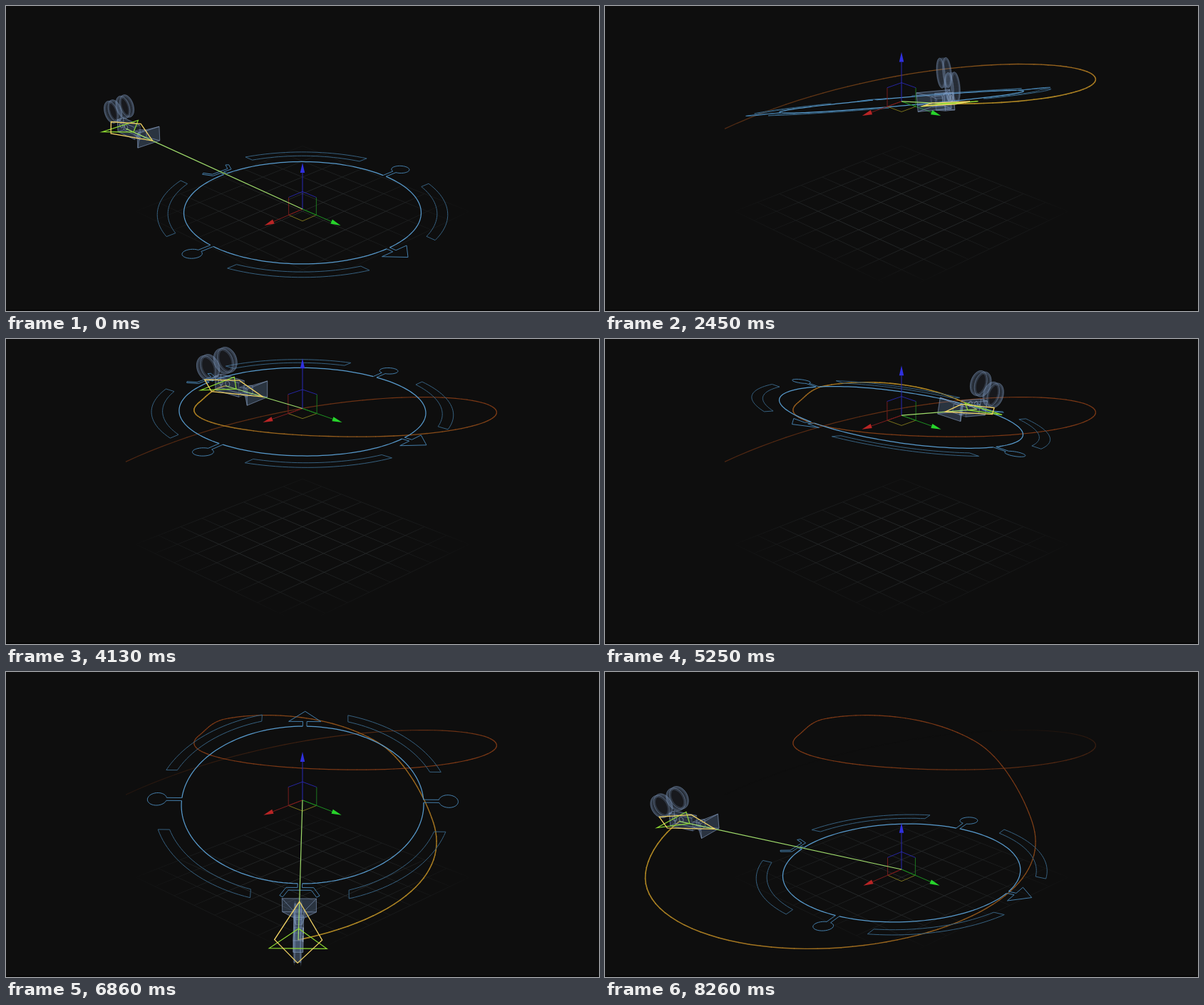
An HTML page with a canvas for the animation above (8.33 s loop, 832 by 428 pixels).

```html
<!DOCTYPE html>
<html>
<head>
<meta charset="utf-8">
<title>Orbiting camera</title>
<style>
html, body { margin: 0; width: 100%; height: 100%; overflow: hidden; background: #0e0e0e; }
canvas { display: block; }
</style>
</head>
<body>
<canvas id="stage" width="832" height="428"></canvas>
<script>
const ctx = document.getElementById('stage').getContext('2d');
const LOOP = 8330, STEP = 70, DIST = 2100, RING = 168.5, GROUND = -82;
const PITCH = 23.5 * Math.PI / 180, SIN = Math.sin(PITCH), COS = Math.cos(PITCH);

// seconds, orbit radius, height above the pivot, height of the pivot
const KEYS = [
  [0, 414, 0, -78.6], [1.4, 278, 84, 17.3], [2.45, 220, 80, 86],
  [3.68, 141, 15, 118], [4.13, 140, 2, 124], [5.25, 157, -33, 114],
  [5.85, 183, -78, 87], [6.86, 258, -83, 37], [7.9, 365, -44, -42],
  [8.26, 399, -13, -69.6]
];

// smooth curve through the keys
function track(t, c) {
  const last = KEYS.length - 1;
  let i = 0;
  while (i < last - 1 && t > KEYS[i + 1][0]) i++;
  const slope = j => {
    const a = KEYS[Math.max(j - 1, 0)], b = KEYS[Math.min(j + 1, last)];
    return (b[c] - a[c]) / (b[0] - a[0]);
  };
  const [a, b] = [KEYS[i], KEYS[i + 1]];
  const d = b[0] - a[0], s = (t - a[0]) / d, q = s * s, k = q * s;
  return (2 * k - 3 * q + 1) * a[c] + (k - 2 * q + s) * d * slope(i)
    + (3 * q - 2 * k) * b[c] + (k - q) * d * slope(i + 1);
}

function pose(t) {
  const az = (223.3 - 85.2 * t) * Math.PI / 180;
  const r = track(t, 1), h = track(t, 2), z = track(t, 3);
  const sx = Math.sin(az), cy = Math.cos(az), len = Math.hypot(r, h), sa = h / len, ca = r / len;
  return {
    pivot: [0, 0, z],
    eye: [r * sx, r * cy, z + h],
    out: [ca * sx, ca * cy, sa],
    side: [cy, -sx, 0],
    up: [-sa * sx, -sa * cy, ca]
  };
}

// x right, y towards the viewer, z up
function project([x, y, z]) {
  const s = DIST / (DIST - y * COS - z * SIN);
  return [416 + x * s, 214 + (y * SIN - z * COS) * s];
}

const offset = (o, a, u, b = 0, v = u, c = 0, w = u) =>
  o.map((n, i) => n + a * u[i] + b * v[i] + c * w[i]);

function draw(points, { stroke, fill, width = 1, close = false }) {
  ctx.beginPath();
  points.forEach(p => ctx.lineTo(...project(p)));
  if (close) ctx.closePath();
  if (fill) { ctx.fillStyle = fill; ctx.fill(); }
  if (stroke) { ctx.strokeStyle = stroke; ctx.lineWidth = width; ctx.stroke(); }
}

const arc = (r, from, to, n = 40, x = 0, y = 0) => Array.from({ length: n + 1 }, (_, i) => {
  const a = from + (to - from) * i / n;
  return [x + r * Math.cos(a), y + r * Math.sin(a)];
});

function drawGrid() {
  const half = 168, k = Math.SQRT1_2;
  const at = (a, b) => [(a - b) * k, (a + b) * k, GROUND];
  // lines fade out towards the rim of the floor
  const [cx, cy] = project([0, 0, GROUND]);
  const g = ctx.createRadialGradient(0, 0, 0, 0, 0, 238);
  g.addColorStop(0, '#303435');
  g.addColorStop(0.5, '#232627');
  g.addColorStop(1, '#0e0e0e');
  ctx.save();
  ctx.beginPath();
  for (let c = -half; c <= half; c += 42) {
    for (const [a, b] of [[at(c, -half), at(c, half)], [at(-half, c), at(half, c)]]) {
      ctx.moveTo(...project(a));
      ctx.lineTo(...project(b));
    }
  }
  ctx.translate(cx, cy);
  ctx.scale(1, 0.43);
  ctx.strokeStyle = g;
  ctx.lineWidth = 1.2;
  ctx.stroke();
  ctx.restore();
}

function drawTrail(now) {
  ctx.lineCap = 'round';
  for (let t = 0; t < now - 0.001; t += 0.035) {
    const age = now - t, x = Math.min(1, age / 3), m = x * x * (3 - 2 * x);
    const alpha = Math.min(1, 0.6 + t * 0.4) * Math.max(0, Math.min(1, (7.5 - age) / 2));
    const mix = (a, b) => Math.round(14 + alpha * (a + (b - a) * m - 14));
    draw([pose(t).eye, pose(Math.min(now, t + 0.035)).eye], {
      stroke: `rgb(${mix(175, 122)},${mix(136, 56)},${mix(36, 22)})`,
      width: 1.6 - 0.4 * m
    });
  }
  ctx.lineCap = 'butt';
}

function drawRing({ pivot, out, side }) {
  const flat = (pts, style) => draw(pts.map(([a, b]) => offset(pivot, a, out, b, side)), style);
  const bright = { stroke: '#5799cb', width: 1.25 }, mid = { stroke: '#447da9' }, dim = { stroke: '#36607f' };
  const gap = 3 / RING, right = Math.PI / 2;
  for (let i = 0; i < 4; i++) {
    flat(arc(RING, i * right + gap, (i + 1) * right - gap), bright);
  }

  const band = [206, 191].map((r, i) => {
    const a = Math.asin(64 / r), pts = arc(r, a, right - a, 24);
    return i ? pts.reverse() : pts;
  }).flat();
  for (const p of [-1, 1]) for (const q of [-1, 1]) {
    flat(band.map(([a, b]) => [a * p, b * q]), { ...dim, close: true });
  }

  for (const q of [-1, 1]) {
    const loop = arc(13.5, -right + 0.23, 3 * right - 0.23, 28, 0, 203);
    flat([[3, RING], ...loop, [-3, RING]].map(([a, b]) => [a, b * q]), mid);
  }
  flat([[-RING, 3], [-180, 3], [-180, 24], [-205, 0], [-180, -24], [-180, -3], [-RING, -3]], mid);
  flat([[RING, 3], [176, 3], [176, 18], [191, 26], [194, 22], [181, 15],
    [181, -15], [194, -22], [191, -26], [176, -18], [176, -3], [RING, -3]], mid);
}

function drawGizmo({ pivot }) {
  const k = Math.SQRT1_2, X = [-k, k, 0], Y = [k, k, 0], Z = [0, 0, 1], c = 27.5;
  const at = (x, y, z) => offset(pivot, x, X, y, Y, z, Z);
  const edge = (stroke, ...pts) => draw(pts.map(p => at(...p.map(n => n * c))), { stroke });
  edge('#77701c', [1, 0, 0], [1, 1, 0], [0, 1, 0]);
  edge('#741c1c', [0, 0, 0], [1, 0, 0], [1, 0, 1]);
  edge('#1d751f', [0, 0, 0], [0, 1, 0], [0, 1, 1]);
  edge('#2525a0', [1, 0, 1], [0, 0, 1], [0, 1, 1]);

  const axis = (dir, size, line, head) => {
    const a = project(pivot), b = project(offset(pivot, size, dir));
    const len = Math.hypot(b[0] - a[0], b[1] - a[1]);
    const dx = (b[0] - a[0]) / len, dy = (b[1] - a[1]) / len;
    const x = b[0] - dx * 14, y = b[1] - dy * 14;
    ctx.strokeStyle = line;
    ctx.lineWidth = 1;
    ctx.beginPath();
    ctx.moveTo(...a);
    ctx.lineTo(x, y);
    ctx.stroke();
    ctx.fillStyle = head;
    ctx.beginPath();
    ctx.moveTo(...b);
    ctx.lineTo(x - dy * 3.2, y + dx * 3.2);
    ctx.lineTo(x + dy * 3.2, y - dx * 3.2);
    ctx.fill();
  };
  axis(X, 75, '#7d1d1d', '#b92525');
  axis(Y, 75, '#1c8d20', '#27d52b');
  axis(Z, 72, '#2929b5', '#3030e0');
}

function drawCamera({ pivot, eye, out, side, up }) {
  // f forward, v sideways, n up
  const at = ([f, v, n = 0]) => offset(eye, -f, out, v, side, n, up);
  const shape = (pts, style) => draw(pts.map(at), { close: true, ...style });
  const glass = { fill: 'rgba(115,145,185,.16)', stroke: 'rgba(140,165,200,.38)', width: 0.9 };

  const tube = (a, b, style = glass) => {
    a.forEach((p, i) => {
      const j = (i + 1) % a.length;
      shape([p, a[j], b[j], b[i]], style);
    });
  };
  const rect = (f, w, lo, hi) => [[f, -w, lo], [f, w, lo], [f, w, hi], [f, -w, hi]];

  for (const [f, n] of [[-33, 20], [0, 38]]) {
    const rim = (r, v) => arc(r, 0, Math.PI * 2, 32, f, n).map(([x, y]) => [x, v, y]);
    tube(rim(18.5, -4), rim(18.5, 4), { fill: 'rgba(120,150,190,.2)' });
    for (const v of [-4, 4]) {
      shape(rim(17, v), { fill: 'rgba(110,140,180,.05)', stroke: 'rgba(120,145,180,.25)', width: 3 });
      shape(rim(18.5, v), { stroke: 'rgba(130,155,190,.4)' });
    }
  }
  tube(rect(-14, 6, -8, 13), rect(30, 6, -8, 13));
  shape(rect(-14, 6, -8, 13), glass);
  tube(rect(30, 4, -3, 6), rect(44, 7, -4, 9));
  tube(rect(44, 8, -4, 9), rect(59, 22, -9, 15));
  shape(rect(59, 22, -9, 15), glass);
  for (const [f, n] of [[-4, 6], [9, 7]]) {
    shape(arc(4, 0, Math.PI * 2, 16, f, n).map(([x, y]) => [x, 6, y]), { stroke: 'rgba(190,210,235,.5)' });
  }

  draw([pivot, eye], { stroke: '#9fdb6b', width: 1.2 });
  shape([[20, 0], [-15, 36], [-15, -36]], { stroke: '#8fdc32', width: 1.2 });
  shape([[69, 0], [0, 30], [-40, 0], [0, -30]], { stroke: '#f0d265', width: 1.3 });
}

function render(now) {
  const t = Math.floor(now % LOOP / STEP) * STEP / 1000;
  const p = pose(t);
  ctx.fillStyle = '#0e0e0e';
  ctx.fillRect(0, 0, 832, 428);
  drawGrid();
  drawTrail(t);
  drawRing(p);
  drawGizmo(p);
  drawCamera(p);
  ctx.fillStyle = '#060606';
  ctx.fillRect(0, 426, 832, 2);
}

const start = performance.now();
function loop() {
  render(performance.now() - start);
  requestAnimationFrame(loop);
}
loop();
</script>
</body>
</html>
```
